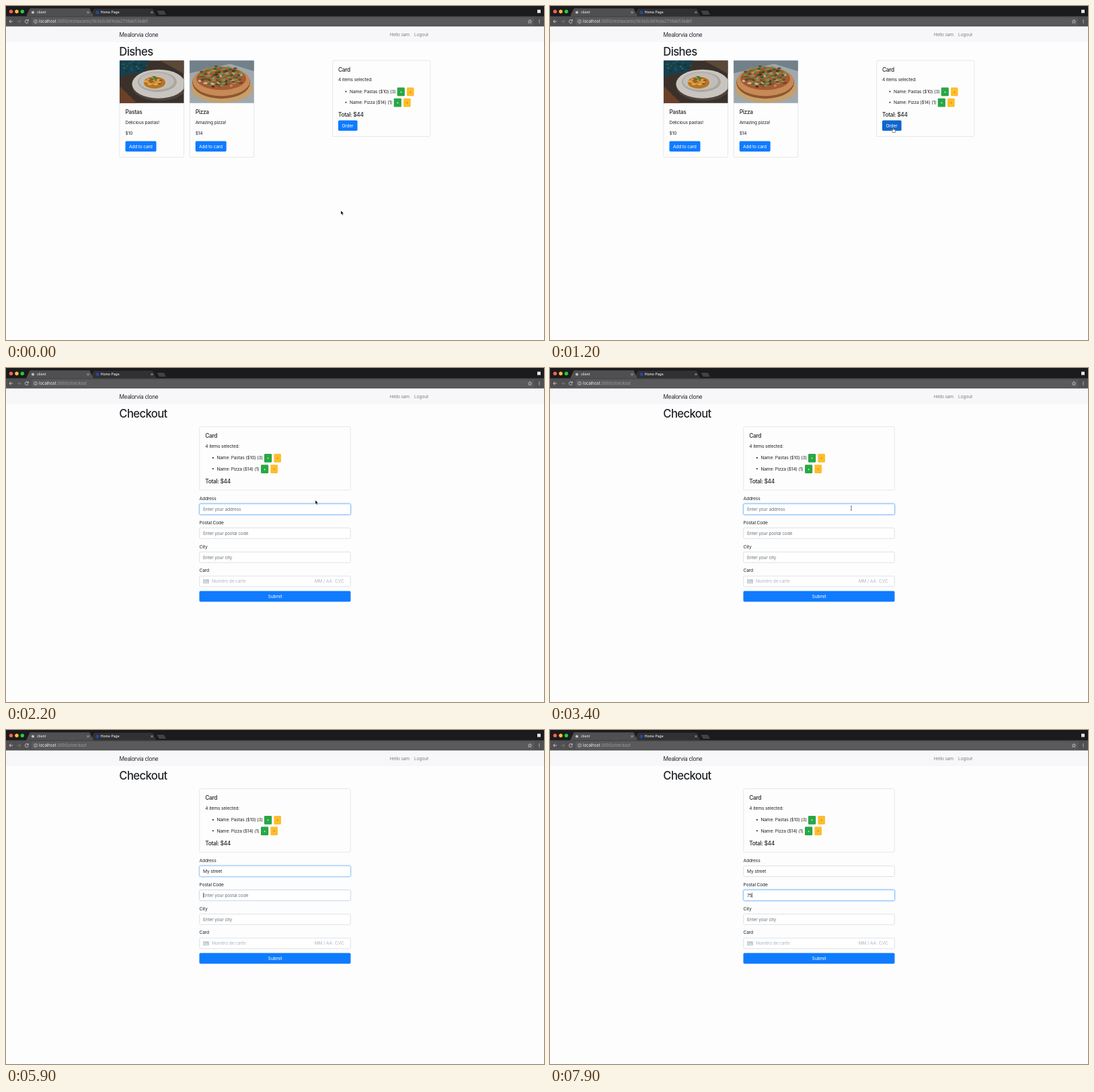
An HTML page that plays this animation: 800x498 px, repeating every 8000 ms.

```html
<!DOCTYPE html>
<html lang="en">
<head>
<meta charset="utf-8">
<title>Checkout demo</title>
<style>
html, body { margin: 0; width: 100%; height: 100%; overflow: hidden; background: #fdfdfd; }
#stage { display: block; width: 800px; height: 498px; }
text { font: 6.66px Inter, "Liberation Sans", sans-serif; letter-spacing: -.025em; fill: #212529; white-space: pre; }
.h1 { font-size: 16.65px; font-weight: 500; letter-spacing: -.037em; }
.h5 { font-size: 8.33px; font-weight: 500; letter-spacing: -.035em; }
.brand { font-size: 8.33px; letter-spacing: -.04em; }
.tab { font-size: 5.1px; font-weight: 500; letter-spacing: 0; fill: #eee; }
.url { font-size: 6px; letter-spacing: 0; fill: #9d9d9d; }
.white { fill: #fff; }
.nav { fill: #808183; }
.hint { fill: #6c757d; }
.pale { fill: #aab7c4; }
.small { font-size: 5.8px; }
.mid { text-anchor: middle; }
.end { text-anchor: end; }
</style>
</head>
<body>
<svg id="stage" viewBox="0 0 800 498"></svg>
<script>
const BLUE = '#0f7bff', GREEN = '#28a745', YELLOW = '#ffbd2b', LINE = '#dfdfe0';

const text = (x, y, s, cls = '', id = '') => `<text x="${x}" y="${y}" class="${cls}" id="${id}">${s}</text>`;
const rect = (x, y, w, h, fill, r = 0, more = '') =>
  `<rect x="${x}" y="${y}" width="${w}" height="${h}" rx="${r}" fill="${fill}" ${more}/>`;
const oval = (x, y, rx, ry, fill) => `<ellipse cx="${x}" cy="${y}" rx="${rx}" ry="${ry}" fill="${fill}"/>`;
const dot = (x, y, r, fill) => oval(x, y, r, r, fill);
const path = (d, stroke, width = .8, fill = 'none') =>
  `<path d="${d}" stroke="${stroke}" stroke-width="${width}" fill="${fill}"/>`;
const box = (x, y, w, h) => rect(x, y, w, h, '#fdfdfd', 1.6, `stroke="${LINE}" stroke-width=".7"`);
const group = (id, s) => `<g id="${id}">${s}</g>`;

// Scattered bits inside an ellipse
const scatter = (n, x, y, rx, ry, size, colors) => Array.from({ length: n }, (_, i) => {
  const a = i * 2.4, r = Math.sqrt((i + .5) / n);
  return oval(x + rx * r * Math.cos(a), y + ry * r * Math.sin(a), size * (1 + i % 3 * .3), size * .7, colors[i % colors.length]);
}).join('');

const pasta = rect(0, 0, 96, 64, '#3b312b') +
  path('M0 0H44L36 17L0 24Z', 'none', 0, '#17404c') +
  scatter(16, 22, 9, 21, 8, 1.4, ['#24708a', '#1d5c46', '#123039']) +
  path('M0 38L26 64H0Z', 'none', 0, '#6b4028') + path('M60 0H96V20Z', 'none', 0, '#5a4838') +
  oval(59, 40, 40, 20, '#4e443d') + oval(58, 35, 39.5, 21.5, '#c8c5c0') +
  oval(56, 32, 29, 15, '#aaa6a1') + oval(55, 31, 26, 13, '#c1bdb6') +
  oval(52, 33, 16, 9, '#b87324') + scatter(18, 51, 31, 12, 6, 2, ['#d99a3b', '#9d5a1e', '#e0ad58']) +
  scatter(4, 51, 27, 5, 3, 1.8, ['#4d7430']);

const pizza = rect(0, 0, 96, 64, '#9fa8ad') + path('M0 0H96V16L60 5L0 19Z', 'none', 0, '#72808a') +
  oval(48, 42, 46, 21, '#c79f6b') + oval(47, 33, 43, 24, '#8e562f') + oval(47, 31, 42.5, 22, '#c58a56') +
  oval(47, 27, 37, 17, '#a45a36') + scatter(32, 47, 27, 34, 14, 2.3, ['#c98a5a', '#8c3925', '#d6b38a', '#59291d']) +
  scatter(54, 46, 23, 34, 15, 2, ['#46783a', '#315d2c', '#6b9450']);

const dish = (x, name, note, price, photo) =>
  box(x, 81.2, 95.6, 144.3) +
  `<svg x="${x}" y="81.2" width="95.6" height="63.6" overflow="hidden">${photo}</svg>` +
  text(x + 8.6, 160.8, name, 'h5') + text(x + 8.6, 175.5, note) + text(x + 8.6, 192, price) +
  rect(x + 8.6, 201.4, 46, 15.6, BLUE, 1.7) + text(x + 14, 211.6, 'Add to card', 'white');

const cartLine = (x, y, label, w) =>
  dot(x + 20, y - 2.4, 1.05, '#212529') + text(x + 25.6, y, label) +
  rect(x + w, y - 8.4, 11.2, 12.8, GREEN, 1.3) + text(x + w + 5.6, y - .1, '+', 'white small mid') +
  rect(x + w + 14.4, y - 8.4, 10.6, 12.8, YELLOW, 1.3) + text(x + w + 19.7, y - .2, '-', 'small mid');

const cart = (x, y, w, h) =>
  box(x, y, w, h) + text(x + 8.5, y + 16.3, 'Card', 'h5') + text(x + 8.5, y + 31, '4 items selected:') +
  cartLine(x, y + 48.7, 'Name: Pastas ($10) (3)', 96.2) +
  cartLine(x, y + 65, 'Name: Pizza ($14) (1)', 91.2) +
  text(x + 8.5, y + 83.9, 'Total: $44', 'h5');

const field = (i, label, id, hint) => {
  const y = 202.6 + 35.85 * i;
  return text(287.6, y - 5.8, label) + rect(287.8, y, 224.5, 15.8, '#fff', 1.6, `id="${id}Box" stroke-width=".7"`) +
    text(293, y + 10.3, hint, 'hint', id);
};

const cross = x => path(`M${x - 1.5} 8l3 3m0-3l-3 3`, '#ccc', .7);

const browser =
  rect(0, 0, 800, 16, '#1b1b1d') +
  dot(7.5, 8.3, 2.7, '#ff5f57') + dot(16, 8.3, 2.7, '#ffbd2e') + dot(24.3, 8.3, 2.7, '#28c940') +
  path('M125 15.5L130 4.5Q130.5 3.5 132 3.5H217Q218.5 3.5 219 4.5L224 15.5Z', '#111', .5, '#313133') +
  path('M30 15.5L35 4.5Q35.5 3.5 37 3.5H123Q124.5 3.5 125 4.5L130 15.5Z', 'none', 0, '#505052') +
  path('M224.5 7H234Q235 7 235.5 8L238 13H228.5Q227.5 13 227 12Z', 'none', 0, '#424244') +
  dot(40, 9.5, 2.1, '#b9c4c8') + dot(136, 9.5, 2.5, '#2448a0') +
  text(46, 11.4, 'client', 'tab') + text(140.7, 11.4, 'Home Page', 'tab') + cross(122) + cross(217) +
  rect(790, 5.5, 5, 5, '#e4e4e4', .6) +
  rect(0, 15.4, 800, 15.3, '#505052') + rect(38, 17.2, 747, 11.6, '#5a5a5c', 1.4) +
  path('M10 23H5M7.3 20.6L4.9 23L7.3 25.4', '#e4e4e4') +
  path('M16.5 23H21.5M19.2 20.6L21.6 23L19.2 25.4', '#858587') +
  path('M32.8 21.5A2.5 2.5 0 1 0 33.2 23.8M33.3 20.2V22.2H31.2', '#e4e4e4') +
  path('M44 22.6V24.7M44 21.1V21.8', '#ddd', .7) + `<circle cx="44" cy="23" r="2.5" fill="none" stroke="#ddd" stroke-width=".6"/>` +
  `<text x="49" y="25.1" class="url"><tspan fill="#eee">localhost</tspan>:3000<tspan id="route"></tspan></text>` +
  path('M779 20.2L779.8 22.1L781.8 22.3L780.3 23.6L780.8 25.6L779 24.5L777.2 25.6L777.7 23.6L776.2 22.3L778.2 22.1Z', '#ddd', .6) +
  [20.9, 23, 25.1].map(y => dot(793, y, .65, '#ddd')).join('');

const stage = document.getElementById('stage');
stage.innerHTML =
  browser + rect(0, 30.7, 800, 23.2, '#f7f7f9') +
  text(168.6, 45.6, 'Mealorvia clone', 'brand') + text(600, 45.2, 'Hello sam', 'nav end') + text(628, 45.2, 'Logout', 'nav end') +
  group('dishes',
    text(168.3, 74, 'Dishes', 'h1') +
    dish(168.9, 'Pastas', 'Delicious pastas!', '$10', pasta) + dish(273.1, 'Pizza', 'Amazing pizza!', '$14', pizza) +
    cart(485.5, 81.2, 145.5, 113.3) +
    rect(494, 170.6, 28.6, 15.5, BLUE, 1.7, 'id="order"') + text(499.4, 180.8, 'Order', 'white')) +
  group('checkout',
    text(168.3, 74, 'Checkout', 'h1') + cart(287.8, 87.6, 224.5, 94.6) +
    field(0, 'Address', 'address', '') + field(1, 'Postal Code', 'postal', '') +
    field(2, 'City', 'city', 'Enter your city') + field(3, 'Card', 'card', '') +
    rect(293, 315, 9, 6.2, '#c3cbd2', .8) + path('M294.3 317.3H296.7M294.3 319.4H300.5', '#fff', .7) +
    text(306, 320.4, 'Numéro de carte', 'pale') + text(485, 320.4, 'MM / AA', 'pale end') + text(502.6, 320.4, 'CVC', 'pale end') +
    rect(287.5, 332.5, 225, 16, BLUE, 1.7) + text(400, 342.9, 'Submit', 'white mid') +
    rect(0, 0, .6, 7.6, '#222', 0, 'id="caret"')) +
  group('pointer',
    group('arrow', path('M0 0V6L1.4 4.8L2.4 7L3.4 6.5L2.4 4.4H4.3Z', '#fff', .4, '#000')) +
    group('hand', path('M-.6 0Q.2-.8.8 0V2.2Q3.6 2.2 3.6 3.6L3 6.8H-.6L-2.4 3.6Q-2-.6 -.6 4Z', '#000', .5, '#fff')) +
    group('beam', path('M-1.2-3.2Q0-3.2 0-2.4V2.4Q0 3.2-1.2 3.2M1.2-3.2Q0-3.2 0-2.4M0 2.4Q0 3.2 1.2 3.2', '#222', .6)));

const $ = id => document.getElementById(id);
const show = (id, on) => $(id).setAttribute('display', on ? 'inline' : 'none');
const clamp = v => Math.max(0, Math.min(1, v));

const LOAD = 1700, SWITCH = 5870;
const route = [[0, 498, 305], [700, 487, 217], [1300, 512, 179], [1700, 512, 179], [2200, 460, 197], [2600, 448, 209]];
const addressKeys = [3600, 3900, 4100, 4400, 4700, 4900, 5100, 5300, 5500];
const postalKeys = [7400, 7700];

function pointerAt(t) {
  const i = route.findIndex(p => p[0] > t);
  if (i < 0) return route[route.length - 1].slice(1);
  const [t0, x0, y0] = route[i - 1], [t1, x1, y1] = route[i];
  const k = (t - t0) / (t1 - t0), e = k * k * (3 - 2 * k);
  return [x0 + (x1 - x0) * e, y0 + (y1 - y0) * e];
}

function type(id, value, hint, keys, t) {
  const n = keys.filter(k => k <= t).length;
  $(id).textContent = n ? value.slice(0, n) : hint;
  $(id).setAttribute('class', n ? '' : 'hint');
  return n ? $(id).getComputedTextLength() : 0;
}

function glow(id, k) {
  const mix = (a, b) => Math.round(a + (b - a) * k);
  $(id).style.stroke = `rgb(${mix(206, 128)},${mix(212, 189)},${mix(218, 255)})`;
  $(id).style.filter = k ? `drop-shadow(0 0 .8px rgba(0,123,255,${.65 * k}))` : 'none';
}

function draw(t) {
  const paid = t >= LOAD;
  show('dishes', !paid);
  show('checkout', paid);
  $('route').textContent = t < 1500 ? '/restaurants/5b3a3c661eda2739ab53adbf' : '/checkout';

  const [x, y] = pointerAt(t);
  const hover = !paid && x > 494 && x < 522.6 && y > 170.6 && y < 186;
  const inField = paid && y > 202.6;
  $('pointer').setAttribute('transform', `translate(${x} ${y})`);
  show('pointer', t < addressKeys[0]);
  show('hand', hover);
  show('beam', inField);
  show('arrow', !hover && !inField);
  $('order').style.fill = hover ? '#0f66cf' : BLUE;
  $('order').style.stroke = t >= 1500 ? '#78b7ff' : 'none';
  $('order').style.strokeWidth = 1.3;

  const lens = [
    type('address', 'My street', 'Enter your address', addressKeys, t),
    type('postal', '75', 'Enter your postal code', postalKeys, t)
  ];
  const k = clamp((t - SWITCH) / 150);
  glow('addressBox', 1 - k);
  glow('postalBox', k);
  glow('cityBox', 0);
  glow('cardBox', 0);

  const row = t >= SWITCH ? 1 : 0;
  const since = Math.max(...[LOAD, SWITCH, ...addressKeys, ...postalKeys].filter(e => e <= t), 0);
  $('caret').setAttribute('x', 293 + lens[row]);
  $('caret').setAttribute('y', 206.7 + 35.85 * row);
  show('caret', (t - since) % 1000 < 500);
}

function frame() {
  draw(Math.floor(performance.now() % 8000 / 100) * 100);
  requestAnimationFrame(frame);
}
frame();
</script>
</body>
</html>
```
